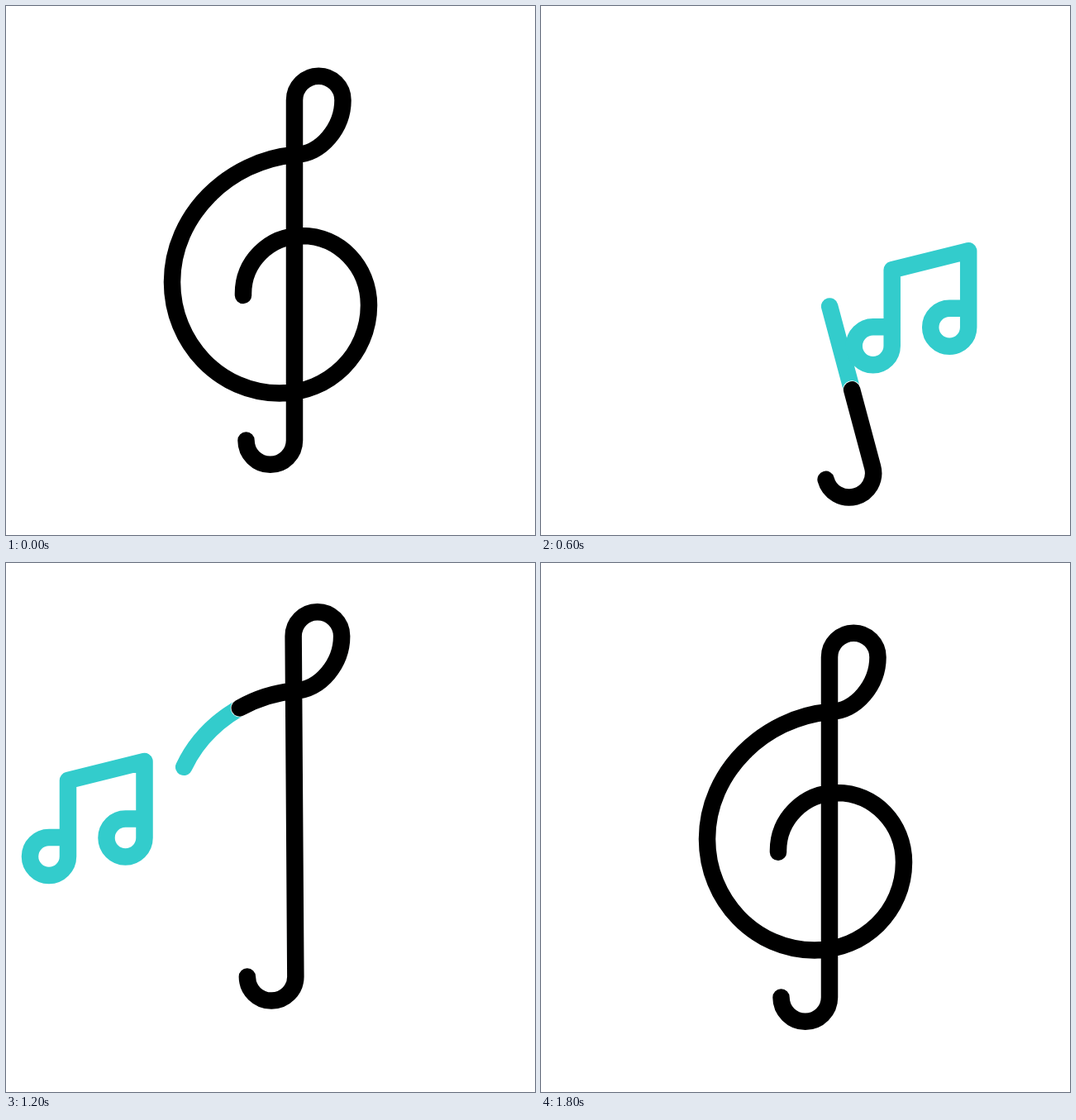
Recreate the animation shown at these times as an HTML page. Size 640 by 640 pixels, loop 2.4 s.

```html
<!DOCTYPE html>
<html lang="en">
<head>
<meta charset="utf-8">
<title>Treble clef</title>
<style>
  html, body { margin: 0; width: 100%; height: 100%; overflow: hidden; background: #fff; }
  svg { display: block; width: 100%; height: 100%; }
</style>
</head>
<body>
<svg viewBox="0 0 640 640">
  <defs>
    <path id="clef" pathLength="1543" d="M290.5 525.5A29.25 29.25 0 0 0 349 525.5V114
      A29.25 29.25 0 0 1 407.5 114C407.5 146 382 180 349 180C270 187 201 253 201 334
      C201 408 259 468.5 331 468.5C391 468.5 439 421 439 362C439 315 403 278 358 278
      C318 278 286 310 287 350"/>
    <path id="note" d="M23-23H0A23 23 0 1 0 23 0V-92L115.5-115V-22.5A23 23 0 1 1 92.5-45.5H115.5"/>
  </defs>
  <g fill="none" stroke="#3cc" stroke-width="20.5" stroke-linejoin="round">
    <g id="body" stroke-linecap="round">
      <use id="tail" href="#clef"/>
      <g id="ink">
        <use href="#clef" stroke="#fff" stroke-width="22"/>
        <use href="#clef" stroke="#000"/>
      </g>
    </g>
    <use id="right" href="#note"/>
    <use id="left" href="#note"/>
  </g>
</svg>
<script>
const LOOP = 2400;
const el = id => document.getElementById(id);

// Smooth curve through [time, value] keys, flat at the ends and at every extreme.
function curve(...keys) {
  const rise = i => (keys[i + 1][1] - keys[i][1]) / (keys[i + 1][0] - keys[i][0]);
  const slopes = keys.map((_, i) => {
    if (!i || i === keys.length - 1) return 0;
    const a = rise(i - 1), b = rise(i);
    return a * b > 0 ? 2 * a * b / (a + b) : 0;
  });
  return t => {
    if (t <= keys[0][0]) return keys[0][1];
    const i = keys.findIndex(k => k[0] > t) - 1;
    if (i < 0) return keys[keys.length - 1][1];
    const [t0, v0] = keys[i], [t1, v1] = keys[i + 1];
    const d = t1 - t0, u = (t - t0) / d, s = u * u * (3 - 2 * u);
    return v0 + (v1 - v0) * s
      + d * u * (1 - u) * (slopes[i] * (1 - u) - slopes[i + 1] * u);
  };
}

const bounce = curve([0, 0], [260, 18], [600, 46.6], [645, 47.6], [940, -24.6], [1070, -42.5],
  [1200, -25.3], [1412, 18], [1480, 14.5], [1620, 2.5], [1690, 0]);
const swing = curve([0, 0], [667, -15.4], [1000, 5], [1267, -1.35], [1533, 2], [1800, 0]);
const inkLength = curve([0, 1543], [667, 150], [685, 150], [1810, 1543]);
const tailLength = curve([59, 1543], [735, 150], [1655, 1543]);

const ramp = (t, a, b) => Math.max(0, Math.min(1, (t - a) / (b - a)));

function floater(id, x, from, to, start, end) {
  const rise = curve([start, from], [end, to]), node = el(id);
  return t => {
    node.setAttribute("transform", `translate(${x} ${rise(t)})`);
    node.setAttribute("opacity", Math.min(ramp(t, start, start + 164), ramp(t, end, end - 195)));
  };
}

const notes = [
  floater("right", 401.7, 563.5, 328.5, 166, 891),
  floater("left", 52, 425, 191, 940, 1660)
];

function trim(id, length) {
  el(id).setAttribute("stroke-dasharray", `${length} 4000`);
}

function draw(t) {
  el("body").setAttribute("transform", `translate(0 ${bounce(t)}) rotate(${swing(t)} 320 320)`);
  trim("ink", inkLength(t));
  trim("tail", tailLength(t));
  notes.forEach(move => move(t));
}

const begin = performance.now();
function frame() {
  draw((performance.now() - begin) % LOOP);
  requestAnimationFrame(frame);
}
frame();
</script>
</body>
</html>
```
